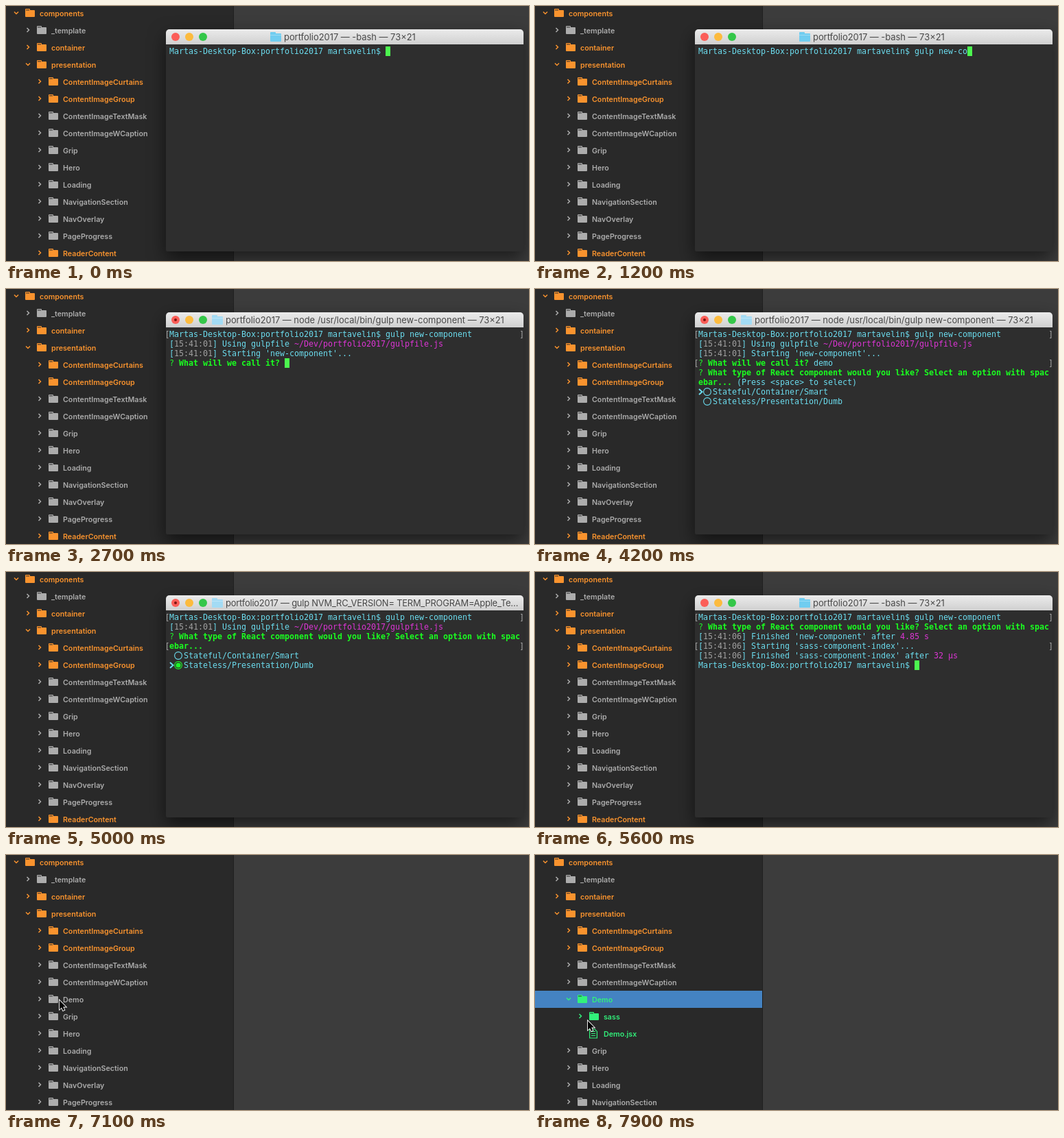
Recreate the animation shown at these times as an HTML page with a canvas. Size 762 by 372 pixels, loop 8000 ms.

```html
<!DOCTYPE html>
<html lang="en">
<head>
<meta charset="utf-8">
<title>New component</title>
<style>
html, body { margin: 0; width: 100%; height: 100%; overflow: hidden; background: #292929; }
canvas { display: block; }
</style>
</head>
<body>
<canvas id="stage" width="762" height="372"></canvas>
<script>
const g = document.getElementById('stage').getContext('2d');
const LOOP = 8000, COL = 7, LINE = 14, LEFT = 238;
const GRAY = '#acacac', ORANGE = '#f9932e', GREEN = '#32f27b';
const INK = { c: '#6bdcee', y: '#a0a0a0', m: '#dc35d4', g: '#1df52a', b: '#1aff20' };
const PROMPT = '|cMartas-Desktop-Box:portfolio2017 martavelin$ ';
const COMMAND = 'gulp new-component';
const stamp = s => `|c[|y15:41:0${s}|c] `;

const clamp = (v, lo, hi) => Math.min(hi, Math.max(lo, v));
const mix = (a, b, k) => a + (b - a) * k;
const typed = (text, t, start, step) => text.slice(0, clamp(Math.floor((t - start) / step), 0, text.length));

function rect(color, x, y, w, h, r = 0) {
  g.fillStyle = color;
  g.beginPath();
  g.roundRect(x, y, w, h, r);
  g.fill();
}

function line(color, width, points, close) {
  g.strokeStyle = color;
  g.lineWidth = width;
  g.beginPath();
  points.forEach(([x, y]) => g.lineTo(x, y));
  if (close) g.closePath();
  g.stroke();
}

function disc(color, x, y, r) {
  g.fillStyle = color;
  g.beginPath();
  g.arc(x, y, r, 0, 7);
  g.fill();
}

// ---- file tree ----
function folder(color, x, y) {
  rect(color, x, y - 7, 7, 5, 1);
  rect(color, x, y - 5, 14, 10, 1);
  rect('#292929', x + 1, y - 5.6, 5, 1);
}

function file(color, x, y) {
  line(color, 1.2, [[x + .6, y - 7], [x + 8, y - 7], [x + 11.4, y - 3.6], [x + 11.4, y + 6], [x + .6, y + 6]], true);
  for (const dy of [-3, 0, 3]) line(color, 1, [[x + 3, y + dy - .5], [x + 9, y + dy - .5]]);
}

function treeRow({ name, depth, color, open, leaf, selected }, y) {
  const x = 15 + depth * 17, ay = y - 1;
  if (selected) rect('#4483c2', 0, y - 13, 331, 25);
  if (leaf) file(color, x + 13, y);
  else {
    line(color, 1.5, open
      ? [[x - 3, ay - 1.5], [x, ay + 1.5], [x + 3, ay - 1.5]]
      : [[x - 1.5, ay - 3], [x + 1.5, ay], [x - 1.5, ay + 3]]);
    folder(color, x + 13, y);
  }
  g.fillStyle = color;
  g.font = '600 10.7px Inter, sans-serif';
  g.fillText(name, x + 34, y + 4);
}

function tree(t) {
  const item = (name, depth, color = GRAY, extra = {}) => ({ name, depth, color, ...extra });
  const open = t >= 7300;
  const rows = [
    item('components', 0, ORANGE, { open: true }),
    item('_template', 1),
    item('container', 1, ORANGE),
    item('presentation', 1, ORANGE, { open: true }),
    item('ContentImageCurtains', 2, ORANGE),
    item('ContentImageGroup', 2, ORANGE),
    item('ContentImageTextMask', 2),
    item('ContentImageWCaption', 2)
  ];
  if (t >= 5700) rows.push(item('Demo', 2, open ? GREEN : GRAY, { open, selected: open }));
  if (open) rows.push(item('sass', 3, GREEN), item('Demo.jsx', 3, GREEN, { leaf: true }));
  for (const name of ['Grip', 'Hero', 'Loading', 'NavigationSection', 'NavOverlay', 'PageProgress'])
    rows.push(item(name, 2));
  rows.push(item('ReaderContent', 2, ORANGE));
  rows.forEach((row, i) => treeRow(row, 11 + 25 * i));
}

// ---- terminal ----
function mono(color, text, x, row, bold) {
  g.fillStyle = color;
  g.font = `${bold ? 'bold ' : ''}11.63px "DejaVu Sans Mono", monospace`;
  g.fillText(text, x, 70 + row * LINE);
}

// Each "|" starts a run whose first letter picks its ink; returns the end x.
function write(row, marked) {
  let x = LEFT;
  for (const run of marked.split('|').slice(1)) {
    const text = run.slice(1);
    mono(INK[run[0]], text, x, row, run[0] === 'b');
    x += text.length * COL;
  }
  return x;
}

const cursor = (x, row) => rect('#4cf74f', x, 59 + row * LINE, 7, 14);

function bracket(row) {
  mono('#a8a8a8', '[', 231.5, row);
  mono('#a8a8a8', ']', 748, row);
}

function choices(top, active, checked, hint) {
  write(top, '|g? |bWhat type of React component would you like? Select an option with spac');
  write(top + 1, '|bebar...' + (hint ? '|c (Press <space> to select)' : ''));
  ['Stateful/Container/Smart', 'Stateless/Presentation/Dumb'].forEach((label, i) => {
    const row = top + 2 + i, y = 66 + row * LINE, on = i === checked;
    if (i === active) line(INK.c, 2, [[239, y - 4], [243.5, y], [239, y + 4]]);
    g.strokeStyle = on ? INK.g : INK.c;
    g.lineWidth = 1.1;
    g.beginPath();
    g.arc(251, y, 5.4, 0, 7);
    g.stroke();
    if (on) disc(INK.g, 251, y, 3.6);
    write(row, '|c   ' + label);
  });
}

function shell(t) {
  if (t < 1900) return cursor(write(0, PROMPT + typed(COMMAND, t, 180, 90)), 0);
  write(0, PROMPT + COMMAND);
  bracket(0);
  if (t < 2300) return cursor(LEFT, 1);
  if (t >= 5500) {
    write(1, '|g? |bWhat type of React component would you like? Select an option with spac');
    write(2, stamp(6) + "|cFinished 'new-component' after |m4.85 s");
    write(3, stamp(6) + "|cStarting 'sass-component-index'...");
    write(4, stamp(6) + "|cFinished 'sass-component-index' after |m32 µs");
    bracket(3);
    return cursor(write(5, PROMPT), 5);
  }
  write(1, stamp(1) + '|cUsing gulpfile |m~/Dev/portfolio2017/gulpfile.js');
  if (t < 4900) write(2, stamp(1) + "|cStarting 'new-component'...");
  if (t < 2500) return cursor(LEFT, 3);
  if (t < 4600) {
    const end = write(3, '|g? |bWhat will we call it? |c' + typed('demo', t, 2900, 120));
    if (t < 3600) return cursor(end, 3);
  }
  bracket(3);
  // Every key press redraws the list one line higher.
  if (t < 4600) choices(4, 0, -1, true);
  else if (t < 4900) choices(3, 1, -1);
  else choices(2, 1, 1);
}

function titleBar(t) {
  const busy = t >= 2100 && t < 5500, truncated = busy && t >= 4600;
  const grad = g.createLinearGradient(0, 34, 0, 56);
  grad.addColorStop(0, '#ebebeb');
  grad.addColorStop(1, '#d0d0d0');
  g.fillStyle = grad;
  g.beginPath();
  g.roundRect(233, 34, 521, 22, [5, 5, 0, 0]);
  g.fill();
  ['#fb5e58', '#fcbb3e', '#34c749'].forEach((color, i) => disc(color, 247 + 20 * i, 45, 6));
  if (busy) disc('#7a1512', 247, 45, 2);

  const x = busy ? 300 : 385, blue = busy ? '#a3dbf4' : '#70cdf0';
  rect(blue, x, 38, 8, 5, 1);
  rect(blue, x, 40, 16, 12, 1);
  rect('rgba(255,255,255,.3)', x, 42, 16, 1);
  const job = !busy ? '-bash — 73×21'
    : truncated ? 'gulp NVM_RC_VERSION= TERM_PROGRAM=Apple_Te…'
    : 'node /usr/local/bin/gulp new-component — 73×21';
  g.fillStyle = '#484848';
  g.font = '12.9px Inter, sans-serif';
  // A title that does not fit is tightened before it is cut.
  g.letterSpacing = truncated ? '-0.2px' : '0px';
  g.fillText('portfolio2017 — ' + job, x + 20, 50);
  g.letterSpacing = '0px';
}

function terminal(t) {
  g.save();
  g.shadowColor = 'rgba(0,0,0,.55)';
  g.shadowBlur = 26;
  g.shadowOffsetY = 10;
  rect('#2e2e2e', 233, 34, 521, 324, [5, 5, 2, 2]);
  g.restore();
  titleBar(t);
  shell(t);
}

// ---- pointer ----
function pointer(t) {
  if (t < 5900) return;
  const arrive = clamp((t - 5900) / 400, 0, 1), drop = clamp((t - 7400) / 400, 0, 1);
  const x = mix(mix(125, 78, arrive), 77, drop), y = mix(mix(240, 212, arrive), 242, drop);
  const shape = [[0, 0], [0, 13.2], [3, 10.4], [5.1, 15], [7.2, 14.1], [5.2, 9.6], [9.3, 9.6]]
    .map(([dx, dy]) => [x + dx, y + dy]);
  line('#fff', 1.8, shape, true);
  g.fillStyle = '#000';
  g.fill();
}

function frame(now) {
  const t = Math.floor(now % LOOP / 100) * 100;
  rect('#292929', 0, 0, 331, 372);
  rect('#3c3c3c', 331, 0, 431, 372);
  rect('#1f1f1f', 331, 0, 1, 372);
  tree(t);
  if (t < 6800) terminal(t);
  pointer(t);
  requestAnimationFrame(frame);
}
requestAnimationFrame(frame);
</script>
</body>
</html>
```
